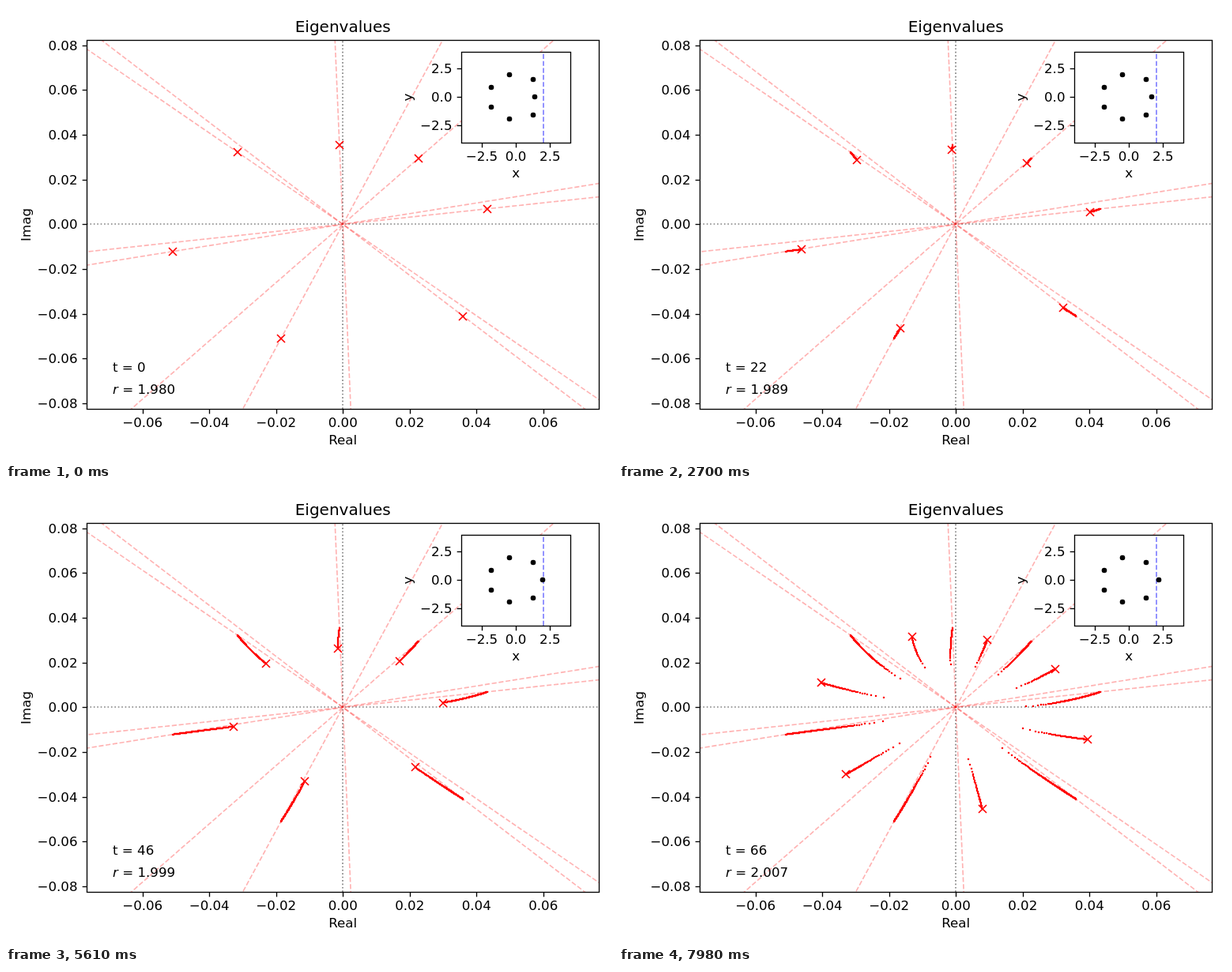
Write an HTML page that moves like this. It is 768 px wide and 576 px high and loops after 8000 ms.

```html
<!DOCTYPE html>
<html lang="en">
<head>
<meta charset="utf-8">
<title>Eigenvalues</title>
<style>
  html, body { margin: 0; width: 100%; height: 100%; overflow: hidden; background: #fff; }
  svg { display: block; width: 768px; height: 576px; }
  text { font: 16.667px "DejaVu Sans", sans-serif; fill: #000; white-space: pre; }
  .title { font-size: 20px; }
  .mid { text-anchor: middle; }
  .end { text-anchor: end; }
  .frame { fill: none; stroke: #000; stroke-width: 1.333; }
  .zero { stroke: #808080; stroke-width: 1.667; stroke-dasharray: 1.667 2.75; }
  .dash { stroke-width: 1.667; stroke-dasharray: 6.167 2.667; }
  .ray { stroke: red; stroke-opacity: .3; }
  .limit { stroke: blue; stroke-opacity: .5; }
  #trail { fill: none; stroke: red; stroke-width: 2.5; stroke-linecap: round; }
  #crosses { fill: none; stroke: red; stroke-width: 1.667; }
</style>
</head>
<body>
<svg viewBox="0 0 768 576">
  <clipPath id="plot"><rect x="102" y="43" width="648" height="467"/></clipPath>
  <g clip-path="url(#plot)">
    <path class="zero" d="M102 276H750M426 510V43"/>
    <g id="rays"></g>
    <path id="trail"/>
    <path id="crosses"/>
  </g>
  <rect class="frame" x="102.5" y="43.5" width="648" height="467"/>
  <g id="mainTicks"></g>
  <text class="title mid" x="426.2" y="33">Eigenvalues</text>
  <text class="mid" x="426.2" y="555">Real</text>
  <text class="mid" transform="translate(31 277) rotate(-90)">Imag</text>
  <text id="time" x="135" y="463"></text>
  <text x="135" y="491"><tspan font-style="italic">r</tspan><tspan id="radius"></tspan></text>

  <rect x="576.5" y="58.5" width="138" height="115" fill="#fff"/>
  <path class="dash limit" d="M680 173V58"/>
  <g id="ring"></g>
  <circle id="mover" cy="115" r="3.333"/>
  <rect class="frame" x="576.5" y="58.5" width="138" height="115"/>
  <g id="insetTicks"></g>
  <text class="mid" x="645.1" y="217">x</text>
  <text class="mid" transform="translate(514 115.5) rotate(-90)">y</text>
</svg>
<script>
const $ = id => document.getElementById(id);
const { PI, abs, cos, sin, round, floor, min, max } = Math;
const STEP = 30, LOOP = 8000, LAST = 266, CRITICAL = 200, BRANCHES = 7;
const main = { x: 426.2, y: 276.35, sx: 4.225, sy: 2.8325 };   // px per 0.001
const inset = { x: 645.1, y: 115.4, sx: 17.28, sy: 14.4 };     // px per 1

// All branches share one series in the seventh root of the distance to the
// critical step; each coefficient is [modulus, phase].
const series = [[45.5, -0.094], [10.3, 1.668], [0.7, 0.92], [1.4, 2.85]];

function offset(n, branch) {
  const d = 1 - n / CRITICAL;
  const u = abs(d) ** (1 / BRANCHES);
  const angle = (2 * branch + (d < 0 ? 1 : 0)) * PI / BRANCHES;
  let x = 0, y = 0;
  series.forEach(([modulus, phase], i) => {
    const r = modulus * u ** (i + 1), a = phase + angle * (i + 1);
    x += r * cos(a);
    y -= r * sin(a);
  });
  return [x * main.sx, y * main.sy];
}

const branches = Array.from({ length: BRANCHES }, (_, k) => k);
const points = Array.from({ length: LAST + 1 }, (_, n) => branches.map(k => {
  const [x, y] = offset(n, k);
  return [round(main.x + x), round(main.y + y)];
}));
const dots = points.map(ps => ps.map(([x, y]) => `M${x} ${y}h0`).join(""));
const cross = ([x, y]) => `M${x - 5} ${y - 5}l10 10m0 -10l-10 10`;

// Each ray starts where it enters the stage, so its dashes do too.
function ray(k) {
  const [x, y] = offset(0, k);
  const reach = s => min(
    ((s * x > 0 ? 769 : -1) - main.x) / (s * x),
    ((s * y > 0 ? 577 : -1) - main.y) / (s * y));
  const end = s => `${main.x + s * reach(s) * x} ${main.y + s * reach(s) * y}`;
  return `<path class="dash ray" d="M${end(-1)}L${end(1)}"/>`;
}
$("rays").innerHTML = branches.map(ray).join("");

const label = (v, digits) => v.toFixed(digits).replace("-", "\u2212");
const xTick = (x, y, s) =>
  `<path class="frame" d="M${round(x) + 0.5} ${y}v5.833"/><text class="mid" x="${x}" y="${y + 22.5}">${s}</text>`;
const yTick = (x, y, s) =>
  `<path class="frame" d="M${x} ${round(y) + 0.5}h-5.833"/><text class="end" x="${x - 12}" y="${round(y) + 6}">${s}</text>`;

function ticks(box, left, bottom, countX, countY, step, digits, unit) {
  let out = "";
  for (let k = -max(countX, countY); k <= max(countX, countY); k++) {
    const s = label(k * step, digits);
    if (abs(k) <= countX) out += xTick(box.x + k * unit * box.sx, bottom, s);
    if (abs(k) <= countY) out += yTick(left, box.y - k * unit * box.sy, s);
  }
  return out;
}
$("mainTicks").innerHTML = ticks(main, 102.5, 510.5, 3, 4, 0.02, 2, 20);
$("insetTicks").innerHTML = ticks(inset, 576.5, 173.5, 1, 1, 2.5, 1, 2.5);

$("ring").innerHTML = branches.slice(1).map(k => {
  const a = k * 2 * PI / BRANCHES;
  const x = round(inset.x + 2 * inset.sx * cos(a));
  const y = round(inset.y - 2 * inset.sy * sin(a));
  return `<circle cx="${x}" cy="${y}" r="3.333"/>`;
}).join("");

let shown = -1;
function draw() {
  const n = min(LAST, floor(performance.now() % LOOP / STEP));
  if (n !== shown) {
    shown = n;
    $("trail").setAttribute("d", dots.slice(0, n + 1).join(""));
    $("crosses").setAttribute("d", points[n].map(cross).join(""));
    $("mover").setAttribute("cx", round(inset.x + inset.sx * (1.4 + 0.003 * n)));
    $("time").textContent = "t = " + floor(n / 4);
    $("radius").textContent = " = " + (1.98 + n * 1e-4 + 1e-9).toFixed(3);
  }
  requestAnimationFrame(draw);
}
draw();
</script>
</body>
</html>
```
